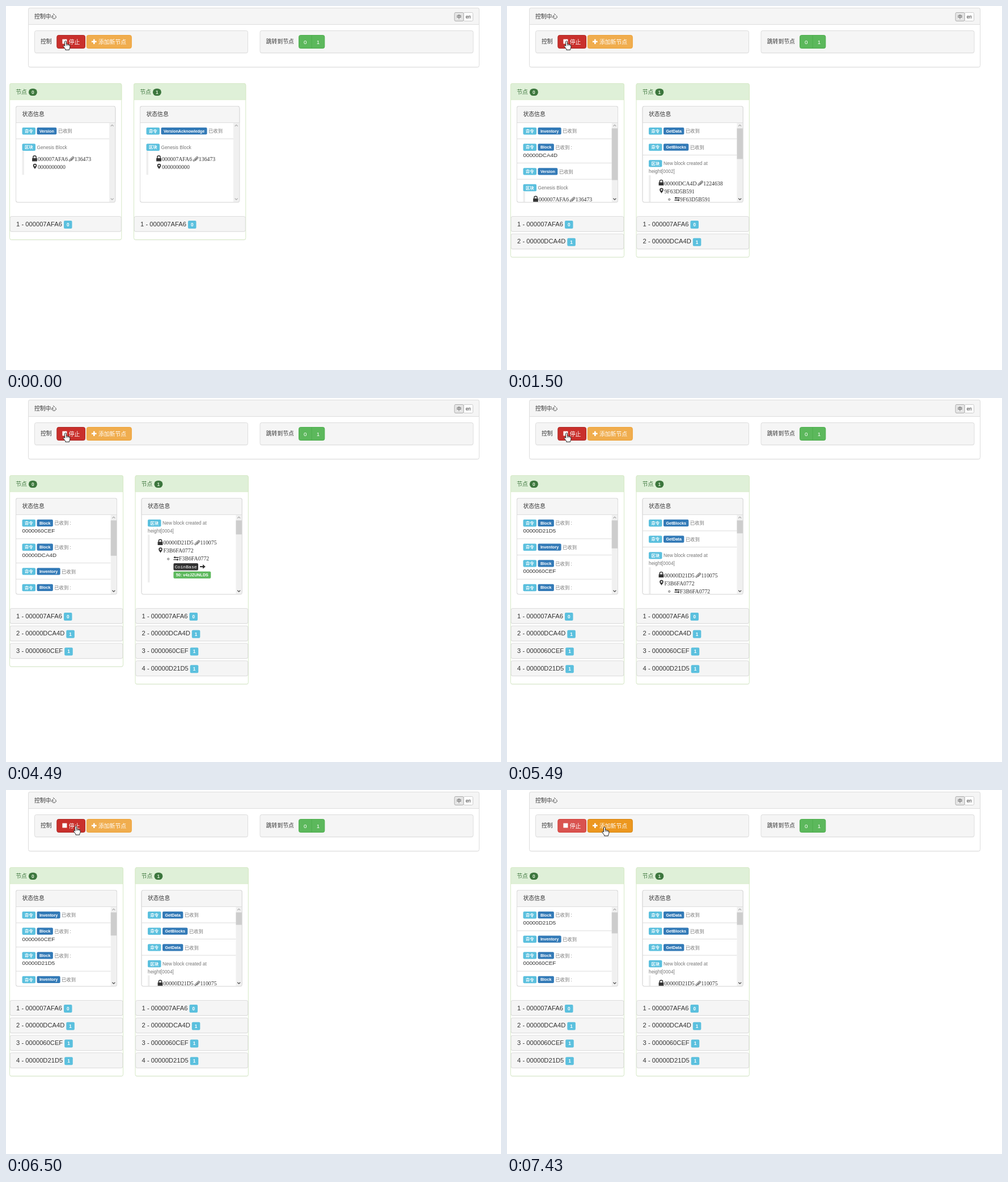
Recreate the animation shown at these times as an HTML page. Size 873 px wide and 641 px high, loop 8000 ms.

```html
<!DOCTYPE html>
<html lang="zh">
<head>
<meta charset="utf-8">
<title>控制中心</title>
<style>
html, body { margin: 0; width: 100%; height: 100%; overflow: hidden; background: #fff; }
svg { display: block; }
text { font-family: "Liberation Sans", "Noto Sans CJK SC", "Noto Sans CJK", sans-serif; white-space: pre; }
.serif { font-family: "Liberation Serif", serif; }
.mono { font-family: "Liberation Mono", monospace; }
.bold { font-weight: bold; }
</style>
</head>
<body>
<svg id="stage" width="873" height="641" viewBox="0 0 873 641"></svg>
<script>
const LOOP = 8000;
const SANS = '"Liberation Sans", "Noto Sans CJK SC", "Noto Sans CJK", sans-serif';
const LIST_TOP = 205.7, LIST_H = 139.8, ROW = 28.6, LINE = 14;
const INK = '#333', GREY = '#777', BORDER = '#ddd', PALE = '#f5f5f5';
const INFO = '#5bc0de', BLUE = '#337ab7', GREEN = '#5cb85c', DARK = '#3c763d';

const A = '000007AFA6', B = '00000DCA4D', C = '0000060CEF', D = '00000D21D5';
const HASHES = [A, B, C, D];
const cmd = (name, hash) => ({ name, hash });
const genesis = { title: 'Genesis Block', hash: A, nonce: '136473', root: '0000000000' };
const mined = (n, hash, nonce, root) =>
  ({ title: 'New block created at', height: `height[000${n}]`, hash, nonce, root });

// Each entry puts its rows on top of the log: [time, rows]
const nodes = [
  {
    blocks: [[0, 1], [1500, 2], [4490, 3], [5490, 4]],
    log: [
      [0, [cmd('Version'), genesis]],
      [1500, [cmd('Inventory'), cmd('Block', B)]],
      [2450, [cmd('Block', B)]],
      [4490, [cmd('Block', C)]],
      [5490, [cmd('Block', D), cmd('Inventory')]],
      [6500, [cmd('Inventory'), cmd('Block', C)]],
      [7430, [cmd('Block', D)]]
    ]
  },
  {
    blocks: [[0, 1], [500, 2], [4490, 4]],
    log: [
      [0, [cmd('VersionAcknowledge'), genesis]],
      [500, [mined(2, B, '1224638', '9F63D5B591')]],
      [1500, [cmd('GetData'), cmd('GetBlocks')]],
      [4490, [mined(4, D, '110075', 'F3B6FA0772'), cmd('GetData'), cmd('GetBlocks'),
        cmd('GetData'), mined(3, C, '287316', '7A41C9E058')]],
      [5490, [cmd('GetBlocks'), cmd('GetData')]],
      [6500, [cmd('GetData')]]
    ]
  }
];
const times = [...new Set(nodes.flatMap(n => [...n.log, ...n.blocks].map(e => e[0])))];

const pen = document.createElement('canvas').getContext('2d');
function widthOf(s, size, weight = '', family = SANS) {
  pen.font = `${weight} ${size}px ${family}`;
  return pen.measureText(s).width;
}

const text = (x, y, s, size = 9.8, fill = INK, cls = '', anchor = 'start') =>
  `<text x="${x}" y="${y}" font-size="${size}" fill="${fill}" class="${cls}" text-anchor="${anchor}">${s}</text>`;
const rect = (x, y, w, h, fill, stroke = 'none', r = 0) =>
  `<rect x="${x}" y="${y}" width="${w}" height="${h}" rx="${r}" fill="${fill}" stroke="${stroke}"/>`;
const path = (d, fill, extra = '') => `<path d="${d}" fill="${fill}" ${extra}/>`;
const at = (x, y, body) => `<g transform="translate(${x} ${y})">${body}</g>`;

// Rounded top strip of a panel
const strip = (x, y, w, h, fill, stroke) =>
  path(`M${x} ${y + h}V${y + 3}q0-3 3-3H${x + w - 3}q3 0 3 3V${y + h}Z`, fill, `stroke="${stroke}"`);
const shadow = (x, y, w, h) => rect(x, y + 1, w, h, '#000', 'none', 3).replace('/>', ' opacity=".07"/>');
const panel = (x, y, w, h, fill = '#fff', stroke = BORDER) =>
  shadow(x, y, w, h) + rect(x, y, w, h, fill, stroke, 3);

function tag(x, y, s, fill, size = 7.2) {
  const w = widthOf(s, size, 'bold') + size * 1.22, h = size * 1.7;
  return { w, svg: rect(x, y, w, h, fill, 'none', 2) + text(x + w / 2, y + h * .71, s, size, '#fff', 'bold', 'middle') };
}

const icon = {
  lock: path('M0-4.2h1V-6a3.4 3 0 0 1 6.8 0v1.8h1v5.6H0ZM2.5-4.2h3.8V-6a1.9 1.6 0 0 0-3.8 0Z', INK),
  clip: path('M2.6-1 6.8-5.2q1.2-1 .3 0L2.9-.3Q1.3 1.2.5-.1.1-1 1.2-2.1L6-6.8Q7.6-8 8.8-6.9 9.8-5.8 8.6-4.5L4.4-.2',
    'none', `stroke="${INK}" stroke-width=".9"`),
  pin: path('M4.9 1.2C3.8-1.2 1.6-2.5 1.6-5a3.3 3.3 0 0 1 6.6 0C8.2-2.5 6-1.2 4.9 1.2ZM4.9-6.5a1.5 1.5 0 1 0 .1 0Z', INK, 'fill-rule="evenodd"'),
  swap: path('M0-5.5 3-7.7v1.5h6.2v1.4H3v1.5ZM9.3-1.7 6.3.5V-1H0v-1.4h6.3v-1.5Z', INK),
  right: path('M0-4.2h5V-7L9.8-3.2 5 .6v-2.8H0Z', INK)
};

function blockDetails(x, y, row) {
  const lines = row.height ? 5 : 2;
  const base = i => y + 38.6 + LINE * i;
  const serif = (tx, i, s) => text(tx, base(i), s, 9.8, INK, 'serif');
  const hashEnd = x + 27.6 + widthOf(row.hash, 9.8, '', '"Liberation Serif", serif');
  let s = rect(x, y + 21, 3.5, 14 + LINE * lines, '#eee') +
    at(x + 17.6, base(0) - .8, icon.lock) + serif(x + 27.4, 0, row.hash) +
    at(hashEnd + 1.5, base(0), icon.clip) + serif(hashEnd + 11.6, 0, row.nonce) +
    at(x + 17.6, base(1) - .8, icon.pin) + serif(x + 27.4, 1, row.root);
  if (!row.height) return s;
  const tx = x + 45.4;
  return s + `<circle cx="${x + 36.2}" cy="${base(2) - 2.8}" r="1.5" fill="none" stroke="${INK}" stroke-width=".8"/>` +
    at(tx, base(2), icon.swap) + serif(tx + 9.7, 2, row.root) +
    rect(tx, base(3) - 9.4, 43.6, 12.6, INK, 'none', 2) +
    text(tx + 21.8, base(3) - .6, 'CoinBase', 8.1, '#fff', 'mono', 'middle') +
    at(tx + 46.6, base(3) - .2, icon.right) +
    tag(tx, base(4) - 8.8, '50: v4zJZUNLDS', GREEN).svg;
}

const rowHeight = r => r.title ? (r.height ? 141 : 85) : ROW + (r.hash ? LINE : 0);

function drawRow(x, y, row) {
  const kind = tag(x, y + 8.3, row.title ? '区块' : '命令', INFO, 7.3);
  const next = x + kind.w + 2.5;
  let s = kind.svg;
  if (row.title) {
    const extra = row.height ? LINE : 0;
    s += text(next, y + 17.5, row.title, 8.33, GREY);
    if (extra) s += text(x, y + 31, row.height, 8.33, GREY);
    return s + blockDetails(x, y + extra, row);
  }
  const name = tag(next, y + 8.3, row.name, BLUE);
  s += name.svg + text(next + name.w + 2.4, y + 17.6, row.hash ? '已收到 :' : '已收到', 8.33, GREY);
  if (row.hash) s += text(x, y + 31.2, row.hash);
  return s;
}

function scrollbar(x, total) {
  const over = total > LIST_H, mid = x + 5.2;
  const arrow = (y, d, c) => path(`M${mid - 2.5} ${y + d}l2.5 ${-2 * d} 2.5 ${2 * d}`, 'none', `stroke="${c}" stroke-width="1.2"`);
  return rect(x, LIST_TOP, 10.4, LIST_H, '#f0f0f0') +
    (over ? rect(x, 215.5, 10.4, 121 * 139 / total, '#cdcdcd') : '') +
    arrow(210.5, 1.2, '#b0b0b0') + arrow(340, -1.2, over ? '#505050' : '#b0b0b0');
}

function drawNode(i, t) {
  const node = nodes[i], wide = t >= 500;
  const x = i ? (wide ? 228 : 225.5) : 6.5;
  const w = wide ? (i ? 199.3 : 200) : 197.3;
  const count = node.blocks.filter(b => b[0] <= t).pop()[1];
  const rows = node.log.filter(e => e[0] <= t).reverse().flatMap(e => e[1]);
  const ix = x + 11, iw = w - 22, bar = ix + iw - 10.8;

  let s = panel(x, 136.5, w, 275 + 30.75 * (count - 1), '#fff', '#d6e9c6') +
    strip(x, 136.5, w, 28.5, '#dff0d8', '#d6e9c6') +
    text(x + 10.8, 155, '节点', 9.8, DARK) +
    rect(x + 33.4, 145.4, 15, 12.6, DARK, 'none', 6.3) +
    text(x + 40.9, 154.8, i, 8.4, '#dff0d8', 'bold', 'middle') +
    panel(ix, 176.5, iw, 169) + strip(ix, 176.5, iw, 29, PALE, BORDER) +
    text(x + 22, 194.4, '状态信息');

  let y = LIST_TOP, list = '';
  rows.forEach((row, k) => {
    if (y < 346) {
      list += drawRow(x + 22, y, row);
      if (k < rows.length - 1) list += rect(ix, y + rowHeight(row) - .9, bar - ix, 1, BORDER);
    }
    y += rowHeight(row);
  });
  s += `<clipPath id="list${i}"><rect x="${ix}" y="${LIST_TOP}" width="${iw}" height="${LIST_H - .5}"/></clipPath>` +
    `<g clip-path="url(#list${i})">${list}${scrollbar(bar, y - LIST_TOP)}</g>` +
    rect(ix, 176.5, iw, 169, 'none', BORDER, 3);

  for (let k = 0; k < count; k++) {
    const by = 370.5 + 30.75 * k, label = `${k + 1} - ${HASHES[k]}`;
    s += panel(x + .6, by, w - 1.2, 26.6, PALE) + text(x + 11.6, by + 17.2, label, 11.2) +
      tag(x + 14.6 + widthOf(label, 11.2), by + 7.6, k ? '1' : '0', INFO, 8.2).svg;
  }
  return s;
}

function drawControls(cx) {
  const stopHot = cx < 140, addHot = cx > 142;
  return panel(39.5, 3.5, 795, 104) + strip(39.5, 3.5, 795, 29, PALE, BORDER) +
    text(50, 22.3, '控制中心') +
    rect(807, 11.5, 16.5, 15, '#fff', '#ccc', 2) + rect(791, 11.5, 16, 15, '#e6e6e6', '#adadad', 2) +
    text(799, 22.1, '中', 8.4, INK, '', 'middle') + text(815.3, 21.8, 'en', 8.4, INK, '', 'middle') +
    panel(50.5, 43.5, 376, 39, PALE) + panel(448, 43.5, 376, 39, PALE) +
    text(61, 66.2, '控制') + text(458.8, 66.2, '跳转到节点') +
    rect(89.8, 51.5, 49.7, 23, stopHot ? '#c9302c' : '#d9534f', stopHot ? '#ac2925' : '#d43f3a', 3) +
    rect(99.4, 58.5, 8, 8, '#fff') + text(110.8, 66.6, '停止', 9.8, '#fff') +
    rect(142.3, 51.5, 79, 23, addHot ? '#ec971f' : '#f0ad4e', addHot ? '#d58512' : '#eea236', 3) +
    path('M151 61.5h3v-3h2.6v3h3V64h-3v3H154v-3h-3Z', '#fff') + text(163, 66.6, '添加新节点', 9.8, '#fff') +
    rect(516.5, 51.5, 45.3, 23, GREEN, '#4cae4c', 3) + rect(538.6, 51.5, 1, 23, '#4cae4c') +
    text(527.8, 66.6, '0', 9.8, '#fff', '', 'middle') + text(550.6, 66.6, '1', 9.8, '#fff', '', 'middle');
}

const hand = path('M-1.4 1.2Q0-.8 1.4 1.2V6Q2.9 5 3.7 6.4 5.3 5.7 6 7.1 7.7 6.8 7.9 8.6V11.4Q7.6 13 6.6 14.3V16H-.3V14.4L-3.7 10.2Q-4.3 8.6-3.3 8.1-2.4 7.7-1.4 9.4Z',
  '#fff', 'stroke="#222" stroke-width="1" stroke-linejoin="round"') +
  path('M1.4 6v3M3.7 6.5V9M6 7.2V9.2', 'none', 'stroke="#222" stroke-width=".7"');

// The pointer travels in ten even steps
function pointer(step) {
  if (step < 0) return [105, 61.3];
  const dx = step <= 6 ? 3 + 7.6 * step : 48.6 + 6.1 * (step - 6);
  return [105 + dx, 61.3 + Math.min(3.5, .5 + .6 * step)];
}

const stage = document.getElementById('stage');
let shown = '';

function render(t) {
  const step = t < 6350 ? -1 : Math.min(9, Math.floor((t - 6350) / 75.5));
  const key = step + '/' + Math.max(...times.filter(v => v <= t));
  if (key === shown) return;
  shown = key;
  const [cx, cy] = pointer(step);
  stage.innerHTML = drawControls(cx) + drawNode(0, t) + drawNode(1, t) + at(cx, cy, hand);
}

const start = performance.now();
function tick() {
  render((performance.now() - start) % LOOP);
  requestAnimationFrame(tick);
}
tick();
</script>
</body>
</html>
```
